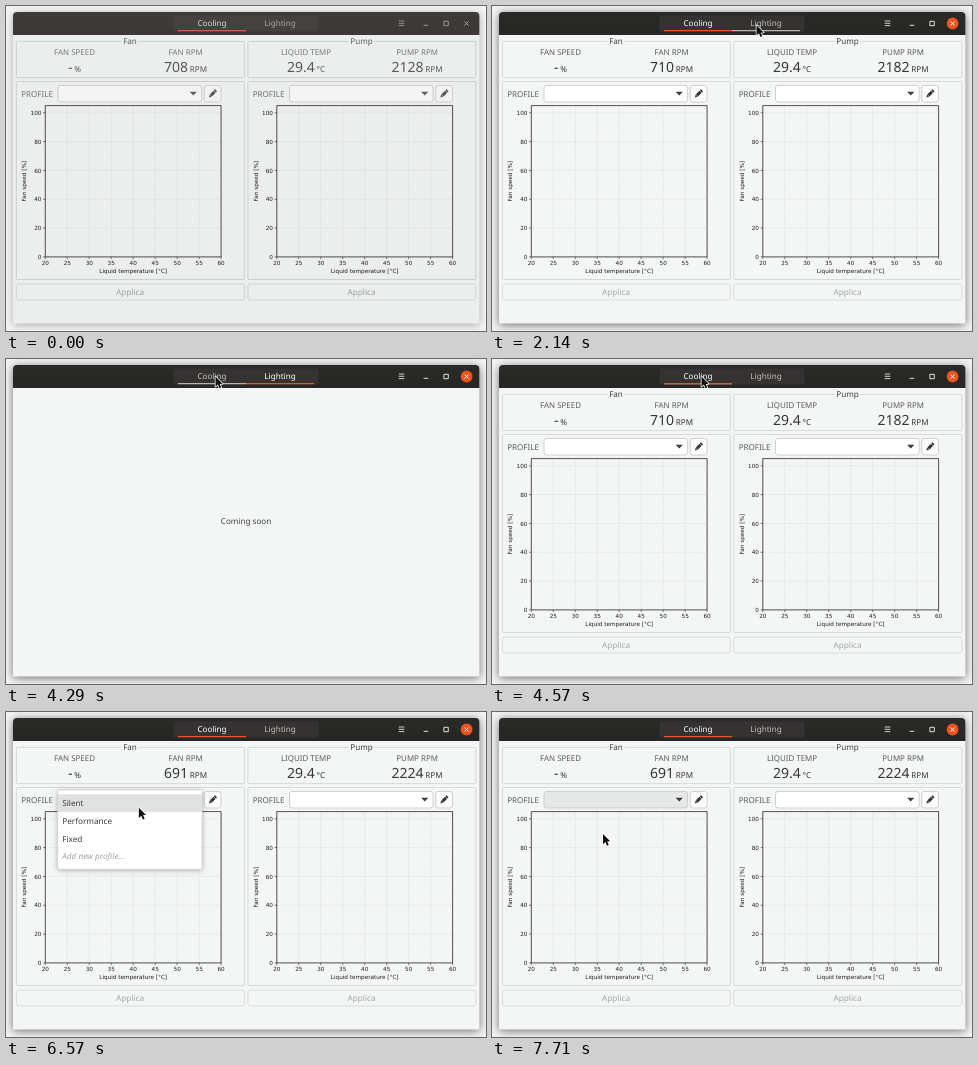
These frames come from a looping animation (480 px wide and 325 px high, 8 s). An HTML page with a canvas:

```html
<!DOCTYPE html>
<html lang="en">
<head>
<meta charset="utf-8">
<title>Cooling control</title>
<style>
html, body { margin: 0; width: 100%; height: 100%; overflow: hidden; background: #f3f4f3; }
canvas { display: block; width: 480px; height: 325px; }
</style>
</head>
<body>
<canvas id="stage"></canvas>
<script>
const W = 480, H = 325, LOOP = 8000, FPS = 7;
const UI = '"Noto Sans", "Open Sans", sans-serif';
const PLOT = '"DejaVu Sans", sans-serif';
const PANEL_GAP = 231.5;
const canvas = document.getElementById('stage');
const c = canvas.getContext('2d');
const dpr = window.devicePixelRatio || 1;
canvas.width = W * dpr;
canvas.height = H * dpr;

const clamp = v => Math.max(0, Math.min(1, v));
const ease = v => v * v * (3 - 2 * v);
const channels = hex => [1, 3, 5].map(i => parseInt(hex.slice(i, i + 2), 16));
function mix(a, b, p) {
  const to = channels(b);
  return `rgb(${channels(a).map((v, i) => Math.round(v + (to[i] - v) * p))})`;
}

function text(str, x, y, size, color, { align = 'left', font = UI, style = '' } = {}) {
  c.font = `${style} ${size}px ${font}`;
  c.textAlign = align;
  c.fillStyle = color;
  c.fillText(str, x, y);
}

function box(x, y, w, h, r, fill, stroke, width = 0.8) {
  c.beginPath();
  c.roundRect(x, y, w, h, r);
  if (fill) { c.fillStyle = fill; c.fill(); }
  if (stroke) { c.strokeStyle = stroke; c.lineWidth = width; c.stroke(); }
}

function path(points, fill, stroke, width = 1) {
  c.beginPath();
  points.forEach(([x, y]) => c.lineTo(x, y));
  if (fill) { c.closePath(); c.fillStyle = fill; c.fill(); }
  if (stroke) { c.strokeStyle = stroke; c.lineWidth = width; c.stroke(); }
}

function shadow(color, blur, dy, draw) {
  c.save();
  c.shadowColor = color;
  c.shadowBlur = blur * dpr;
  c.shadowOffsetY = dy * dpr;
  draw();
  c.restore();
}

function faded(alpha, draw) {
  if (alpha <= 0) return;
  c.save();
  c.globalAlpha = alpha;
  draw();
  c.restore();
}

// Each move: first step, last step, destination of the pointer.
const START = [416, 38];
const MOVES = [[5, 9, 264.5, 19.3], [23, 27, 209.5, 17.5], [34, 39, 140.5, 86.5], [45, 48, 111, 122]];
function pointerAt(k) {
  let [x, y] = START;
  for (const [from, to, tx, ty] of MOVES) {
    const p = ease(clamp((k - from) / (to - from)));
    x += (tx - x) * p;
    y += (ty - y) * p;
  }
  return [x, y];
}

function stateAt(k) {
  const [x, y] = pointerAt(k);
  const onTabs = k >= 5 && y < 27;
  return {
    x, y,
    pointer: k >= 5,
    focus: clamp((k - 13) / 2),
    page: k < 24 ? [0.3, 0.75, 1][Math.min(k, 18) - 16] || 0 : k < 31 ? 1 : k < 32 ? 0.45 : 0,
    hover: onTabs && x > 172 && x < 308 ? (x < 240 ? 0 : 1) : -1,
    rpm: k < 14 ? ['708', '2128'] : k < 35 ? ['710', '2182'] : ['691', '2224'],
    popup: k < 42 || k >= 54 ? 0 : k < 43 ? 0.6 : 1,
    combo: k >= 54 ? '#e6e8e7' : k >= 41 ? '#f5f6f5' : '#ffffff'
  };
}

function titlebar(s) {
  const g = c.createLinearGradient(0, 6, 0, 29);
  g.addColorStop(0, mix('#3e3b38', '#2b2a29', s.focus));
  g.addColorStop(1, mix('#3b3835', '#262625', s.focus));
  box(7, 6, 466.4, 23, [4, 4, 0, 0], g);
  box(167.5, 9.5, 145, 16, 2.5, mix('#45413e', '#343332', s.focus));

  const dim = mix('#aaa69f', '#c3c1bd', s.focus), lit = mix('#dedad5', '#ffffff', s.focus);
  ['Cooling', 'Lighting'].forEach((name, i) => {
    const on = i ? s.page : 1 - s.page, x = 172 + i * 68;
    const tone = on > 0.5 ? lit : dim;
    text(name, x + 34, 20.4, 8.1, tone, { align: 'center' });
    if (s.hover === i) box(x, 23.9, 68, 1.4, 0, '#b5b4b1');
    faded(on, () => box(x, 23.9, 68, 1.4, 0, mix('#c9623e', '#e95420', s.focus)));
  });

  const icon = mix('#9b9893', '#dededc', s.focus);
  for (const y of [15, 17.3, 19.6]) path([[392.7, y], [398.3, y]], null, icon, 0.9);
  path([[417.6, 19.3], [422.2, 19.3]], null, icon, 1);
  box(437.9, 15.3, 4.4, 4.4, 0, null, icon, 1);
  faded(s.focus, () => {
    c.beginPath();
    c.arc(460.6, 17.5, 5.9, 0, 7);
    c.fillStyle = '#e95420';
    c.fill();
  });
  const cross = mix('#aaa7a2', '#ffffff', s.focus);
  path([[458.6, 15.5], [462.6, 19.5]], null, cross, 1);
  path([[462.6, 15.5], [458.6, 19.5]], null, cross, 1);
}

function reading(label, value, unit, x, s) {
  text(label, x, 49.4, 7.95, mix('#777878', '#5b5c5c', s.focus), { align: 'center' });
  const big = mix('#555656', '#353636', s.focus);
  c.font = `14px ${UI}`;
  const valueWidth = c.measureText(value).width;
  c.font = `8.1px ${UI}`;
  const left = x - (valueWidth + 1.7 + c.measureText(unit).width) / 2;
  text(value, left, 66, 14, big);
  text(unit, left + valueWidth + 1.7, 66, 8.1, big);
}

function pencil(x, y, color) {
  c.save();
  c.translate(x, y);
  c.rotate(Math.PI / 4);
  box(-1.5, -4.9, 3, 1.7, 0.5, color);
  box(-1.5, -2.8, 3, 5.1, 0, color);
  path([[-1.5, 2.6], [1.5, 2.6], [0, 5.3]], color);
  c.restore();
}

function chart(ink, grid) {
  const L = 39.3, R = 215.1, T = 99.6, B = 250.9;
  for (let i = 0; i <= 8; i++) {
    const x = L + (R - L) * i / 8;
    c.setLineDash([1.6, 0.7]);
    path([[x, T], [x, B]], null, grid, 0.6);
    c.setLineDash([]);
    path([[x, B], [x, B + 2.2]], null, ink, 0.6);
    text(20 + i * 5, x, 259.4, 5.7, ink, { align: 'center', font: PLOT });
  }
  for (let v = 0; v <= 100; v += 20) {
    const y = B - (B - T) * v / 105;
    c.setLineDash([1.6, 0.7]);
    path([[L, y], [R, y]], null, grid, 0.6);
    c.setLineDash([]);
    path([[L - 2.2, y], [L, y]], null, ink, 0.6);
    text(v, L - 3.9, y + 2.1, 5.7, ink, { align: 'right', font: PLOT });
  }
  box(L, T, R - L, B - T, 0, null, ink, 0.75);
  text('Liquid temperature [°C]', 127.2, 267.3, 5.7, ink, { align: 'center', font: PLOT });
  c.save();
  c.translate(20.3, 175.2);
  c.rotate(-Math.PI / 2);
  text('Fan speed [%]', 0, 0, 5.7, ink, { align: 'center', font: PLOT });
  c.restore();
}

function panel(title, readings, comboFill, bg, s) {
  const line = mix('#c6c8c7', '#cfd2d0', s.focus);
  const ink = mix('#5e5f5f', '#3d3e3e', s.focus);
  box(10.4, 35.4, 228, 36.2, 1, null, line);
  c.font = `8.1px ${UI}`;
  const gap = c.measureText(title).width + 3;
  box(124 - gap / 2, 34.5, gap, 2, 0, bg);
  text(title, 124, 38.2, 8.1, ink, { align: 'center' });
  readings.forEach(([label, value, unit], i) => reading(label, value, unit, i ? 179.6 : 68.5, s));

  box(10.4, 75.5, 228, 198, 1, null, line);
  text('PROFILE', 15.2, 90.5, 8.05, mix('#707171', '#5b5c5c', s.focus));
  const edge = mix('#c3c5c4', '#c2c5c3', s.focus);
  box(52, 79.4, 143.6, 16.6, 2.5, mix('#f3f4f3', comboFill, s.focus), edge);
  path([[183.6, 85.7], [190.9, 85.7], [187.25, 89.6]], mix('#626363', '#3d3d3d', s.focus));
  box(198.2, 79.4, 16.8, 16.6, 2.5, mix('#f1f2f1', '#fbfcfb', s.focus), edge);
  pencil(206.6, 87.7, mix('#555555', '#353535', s.focus));

  chart('#1e1e1e', mix('#d4d6d5', '#d9dbda', s.focus));
  box(10.4, 278, 228, 16, 2.5, null, mix('#cccecd', '#d2d5d3', s.focus));
  text('Applica', 124, 289, 8.2, mix('#9d9f9e', '#a5a7a6', s.focus), { align: 'center' });
}

function popup(s) {
  const row = 17.7, top = 82.3;
  shadow('rgba(0,0,0,.32)', 5, 1, () => box(51.7, 78, 144.4, 79.3, 1.5, '#ffffff'));
  box(51.7, 78, 144.4, 79.3, 1.5, '#ffffff', '#c5c7c6', 0.6);
  const active = Math.floor((s.y - top) / row);
  box(52, top + active * row, 143.8, row, 0, '#e0e2e1');
  ['Silent', 'Performance', 'Fixed', 'Add new profile...'].forEach((name, i) =>
    text(name, 56.2, top + i * row + 11.8, 8.2, i < 3 ? '#3d3d3d' : '#a3a4a4', { style: i < 3 ? '' : 'italic' }));
}

function pointer(x, y) {
  const arrow = [[0, 0], [0, 10.2], [2.4, 8], [4, 11.8], [5.8, 11], [4.2, 7.4], [7.2, 7.3]]
    .map(([dx, dy]) => [x + dx, y + dy]);
  c.lineJoin = 'round';
  c.beginPath();
  arrow.forEach(p => c.lineTo(...p));
  c.closePath();
  c.strokeStyle = '#ffffff';
  c.lineWidth = 1.5;
  c.stroke();
  path(arrow, '#111111');
  c.lineJoin = 'miter';
}

function draw(k) {
  const s = stateAt(k), bg = mix('#eceeed', '#f4f6f5', s.focus);
  c.setTransform(dpr, 0, 0, dpr, 0, 0);
  c.textRendering = 'geometricPrecision';
  c.fillStyle = '#f3f4f3';
  c.fillRect(0, 0, W, H);
  shadow(`rgba(0,0,0,${0.3 + 0.25 * s.focus})`, 8 + 2 * s.focus, 1.6, () => box(7, 6, 466.4, 311.5, [4, 4, 1, 1], bg));
  titlebar(s);

  faded(1 - s.page, () => {
    panel('Fan', [['FAN SPEED', '-', '%'], ['FAN RPM', s.rpm[0], 'RPM']], s.combo, bg, s);
    c.translate(PANEL_GAP, 0);
    panel('Pump', [['LIQUID TEMP', '29.4', '°C'], ['PUMP RPM', s.rpm[1], 'RPM']], '#ffffff', bg, s);
  });
  faded(s.page, () => text('Coming soon', 240, 164.5, 8.1, '#3d3e3e', { align: 'center' }));
  faded(s.popup, () => popup(s));
  if (s.pointer) pointer(s.x, s.y);
}

const begin = performance.now();
function tick() {
  const t = (performance.now() - begin) % LOOP;
  draw(Math.floor((t + 5) * FPS / 1000) % (LOOP * FPS / 1000));
  requestAnimationFrame(tick);
}
tick();
</script>
</body>
</html>
```
